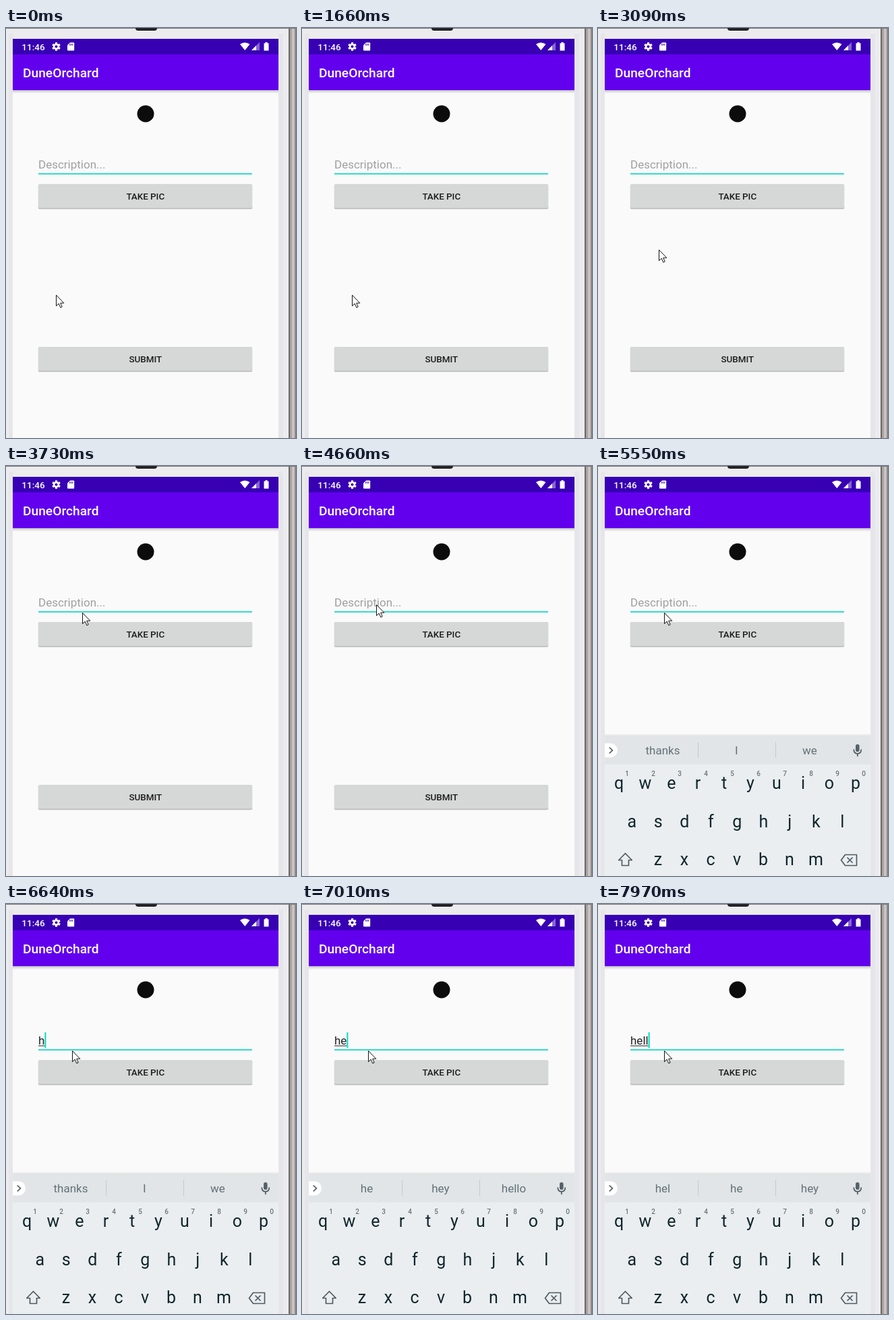
An HTML page for the animation above (8 s loop, 430x607 px).

```html
<!DOCTYPE html>
<html lang="en">
<head>
<meta charset="utf-8">
<title>Photo post form</title>
<style>
  html, body { margin: 0; width: 100%; height: 100%; overflow: hidden; background: #ececef; }
  svg { display: block; width: 430px; height: 607px; }
  text { font-family: Roboto, sans-serif; white-space: pre; }
  .medium { font-weight: 500; }
  .mid { text-anchor: middle; }
  .button { font-size: 13.4px; fill: #1c1c1c; }
  .field { font-size: 17px; }
  .word { font-size: 17px; fill: #647177; }
  .key { font-size: 25px; fill: #10262d; }
  .digit { font-size: 10px; fill: #68747a; }
  .line { fill: none; stroke: #4e5b61; stroke-width: 1.7; }
</style>
</head>
<body>
<svg viewBox="0 0 430 607" xmlns="http://www.w3.org/2000/svg">
  <defs>
    <linearGradient id="drop" x2="0" y2="1">
      <stop offset="0" stop-color="#000" stop-opacity=".22"/>
      <stop offset="1" stop-color="#000" stop-opacity="0"/>
    </linearGradient>
    <linearGradient id="rise" y1="1" x2="0" y2="0">
      <stop offset="0" stop-color="#000" stop-opacity=".1"/>
      <stop offset="1" stop-color="#000" stop-opacity="0"/>
    </linearGradient>
    <clipPath id="screen"><rect x="10" y="16" width="394" height="591"/></clipPath>
  </defs>

  <!-- device frame -->
  <rect width="430" height="607" fill="#ececef"/>
  <rect x="4" y="8" width="6" height="599" fill="#e6e6ea"/>
  <rect x="404" y="8" width="7" height="599" fill="#e6e6ea"/>
  <rect x="419" width="2" height="607" fill="#6b6766"/>
  <rect x="421" width="3" height="607" fill="#aaa5a4"/>
  <rect x="424" width="4" height="607" fill="#c8c3c2"/>
  <rect x="428" width="2" height="607" fill="#8e8988"/>
  <rect width="430" height="1" fill="#77757a"/>
  <path d="M192 0h32q0 4-4 4h-24q-4 0-4-4z" fill="#232325"/>

  <g clip-path="url(#screen)">
    <rect x="10" y="16" width="394" height="591" fill="#fafafa"/>
    <rect x="10" y="92" width="394" height="5" fill="url(#drop)"/>
    <rect x="10" y="39" width="394" height="53" fill="#6200ee"/>
    <rect x="10" y="16" width="394" height="23" fill="#3700b3"/>

    <!-- status bar -->
    <g fill="#fff">
      <text class="medium" x="23.3" y="33" font-size="13.5">11:46</text>
      <g id="gear" transform="translate(74.5 27.5)"></g>
      <path d="M95 21.5h5.2q1 0 1 1v10q0 1-1 1h-8.2q-1 0-1-1v-7z"/>
      <path d="M94.6 23.3v2.6m2-2.6v2.6m2-2.6v2.6" stroke="#3700b3"/>
      <path d="M347 24q7-5 14.500 0l-7.250 9z"/>
      <path d="M376 21v12h-12z" opacity=".4"/>
      <path d="M371 26v7h-7z"/>
      <path d="M382.500 22.500h2v-1.500h3v1.500h2v11h-7z"/>
      <text class="medium" x="25" y="73" font-size="19.200">DuneOrchard</text>
    </g>

    <circle cx="207" cy="127" r="12.500" fill="#0c0c0c"/>

    <!-- form -->
    <rect x="48" y="215" width="317" height="1.800" fill="#1fd8c8"/>
    <text id="hint" class="field" x="48" y="208" fill="#a0a0a0">Description...</text>
    <text id="typed" class="field" x="48" y="208" fill="#212121"></text>
    <rect id="under" x="48" y="209.500" height="1" fill="#212121"/>
    <rect id="caret" y="190" width="2" height="23" fill="#03dac5"/>
    <g id="buttons"></g>

    <!-- keyboard -->
    <g id="board">
      <rect x="10" y="396" width="394" height="4" fill="url(#rise)"/>
      <rect x="10" y="400" width="394" height="210" fill="#eaeef1"/>
      <rect x="10" y="400" width="394" height="41.500" fill="#e1e5e8"/>
      <path d="M10 410.500h8.500a10.500 10.500 0 0 1 0 21H10z" fill="#fff"/>
      <path class="line" d="M16.800 416.500l4.600 4.500-4.600 4.500" stroke-width="2"/>
      <path d="M148.500 409v23M263.500 409v23" stroke="#c3c9cd"/>
      <rect x="382" y="412" width="5.600" height="11" rx="2.800" fill="#566369"/>
      <path class="line" d="M379.300 419.500q0 6.300 5.500 6.300t5.500-6.300M384.800 426v4"/>
      <g id="words"></g>
      <g id="keys"></g>
      <path class="line" d="M40.500 573.500l9.800 10h-4.800v8h-10v-8h-4.800z" stroke-linejoin="round"/>
      <path class="line" d="M366.500 575.500h17v16h-17l-6-8z" stroke-linejoin="round"/>
      <path class="line" d="M369.500 579.500l8 8m0-8l-8 8"/>
    </g>
  </g>

  <path id="mouse" d="M0 0V16L3.700 12.600 6.300 18.400 8.700 17.300 6.200 11.700H11.300Z"
        fill="#fff" stroke="#111" stroke-linejoin="round"/>
</svg>

<script>
const LOOP = 8000;
const $ = id => document.getElementById(id);

function add(parent, tag, attrs, label) {
  const el = document.createElementNS("http://www.w3.org/2000/svg", tag);
  for (const name in attrs) el.setAttribute(name, attrs[name]);
  if (label) el.textContent = label;
  parent.appendChild(el);
  return el;
}

function addButton(y, label) {
  const g = $("buttons"), box = { x: 48, width: 317, rx: 2 };
  add(g, "rect", { ...box, x: 47.5, width: 318, y: y, height: 37.5, fill: "#000", opacity: .08 });
  add(g, "rect", { ...box, y: y + 1, height: 36, fill: "#000", opacity: .18 });
  add(g, "rect", { ...box, y, height: 35.5, fill: "#d6d7d7" });
  add(g, "text", { class: "medium mid button", x: 206.8, y: y + 22.5 }, label);
}

function addRow(letters, x, y) {
  [...letters].forEach((c, i) =>
    add($("keys"), "text", { class: "mid key", x: x + i * 39, y }, c));
}

addButton(231, "TAKE PIC");
addButton(472, "SUBMIT");

addRow("qwertyuiop", 31, 478);
addRow("asdfghjkl", 50.3, 534.5);
addRow("zxcvbnm", 89, 591);
[..."1234567890"].forEach((c, i) =>
  add($("keys"), "text", { class: "medium mid digit", x: 43 + i * 39, y: 459 }, c));

const words = [96, 205.3, 314].map(x =>
  add($("words"), "text", { class: "mid word", x, y: 427 }));

for (let a = 0; a < 360; a += 60)
  add($("gear"), "rect", { x: -1.6, y: -6.3, width: 3.2, height: 4, rx: .5, transform: `rotate(${a})` });
add($("gear"), "circle", { r: 4.6 });
add($("gear"), "circle", { r: 2, fill: "#3700b3" });

// Each track lists [start time, value]; a value holds until the next start.
const blink = [140, 590, 1120, 1660, 2160, 2690, 3210, 3580, 4160, 4660, 5030, 5550, 6080, 7290, 7720];
const typing = [[0, ""], [6640, "h"], [6760, "he"], [7720, "hel"], [7970, "hell"]];
const guesses = [
  [0, ["thanks", "I", "we"]],
  [7010, ["he", "hey", "hello"]],
  [7850, ["hel", "he", "hey"]]
];
const pointer = [
  [0, [74, 395]], [3090, [90, 328]], [3210, [110, 285]], [3330, [122, 250]],
  [3450, [118, 230]], [3580, [113, 220]], [3730, [113, 217]], [3880, [111, 209]],
  [4010, [110, 205]], [5150, [104, 211]], [5270, [98, 217]]
];
const keyboard = [
  [0, { shift: 0, alpha: 0 }],
  [4910, { shift: 2, alpha: .96 }],
  [5030, { shift: 0, alpha: 1 }]
];

const at = (track, t) => track.filter(step => step[0] <= t).pop()[1];

function draw(t) {
  const value = at(typing, t);
  $("typed").textContent = value;
  $("hint").style.display = value ? "none" : "";
  const width = value ? $("typed").getComputedTextLength() : 0;
  $("under").setAttribute("width", width);
  $("caret").setAttribute("x", 48 + width);
  $("caret").setAttribute("opacity", blink.filter(b => b <= t).length % 2);

  at(guesses, t).forEach((word, i) => words[i].textContent = word);

  const { shift, alpha } = at(keyboard, t);
  $("board").setAttribute("transform", `translate(0 ${shift})`);
  $("board").setAttribute("opacity", alpha);

  const [x, y] = at(pointer, t);
  $("mouse").setAttribute("transform", `translate(${x + .5} ${y + .5})`);
}

const start = performance.now();
function tick() {
  draw((performance.now() - start) % LOOP);
  requestAnimationFrame(tick);
}
tick();
</script>
</body>
</html>
```
